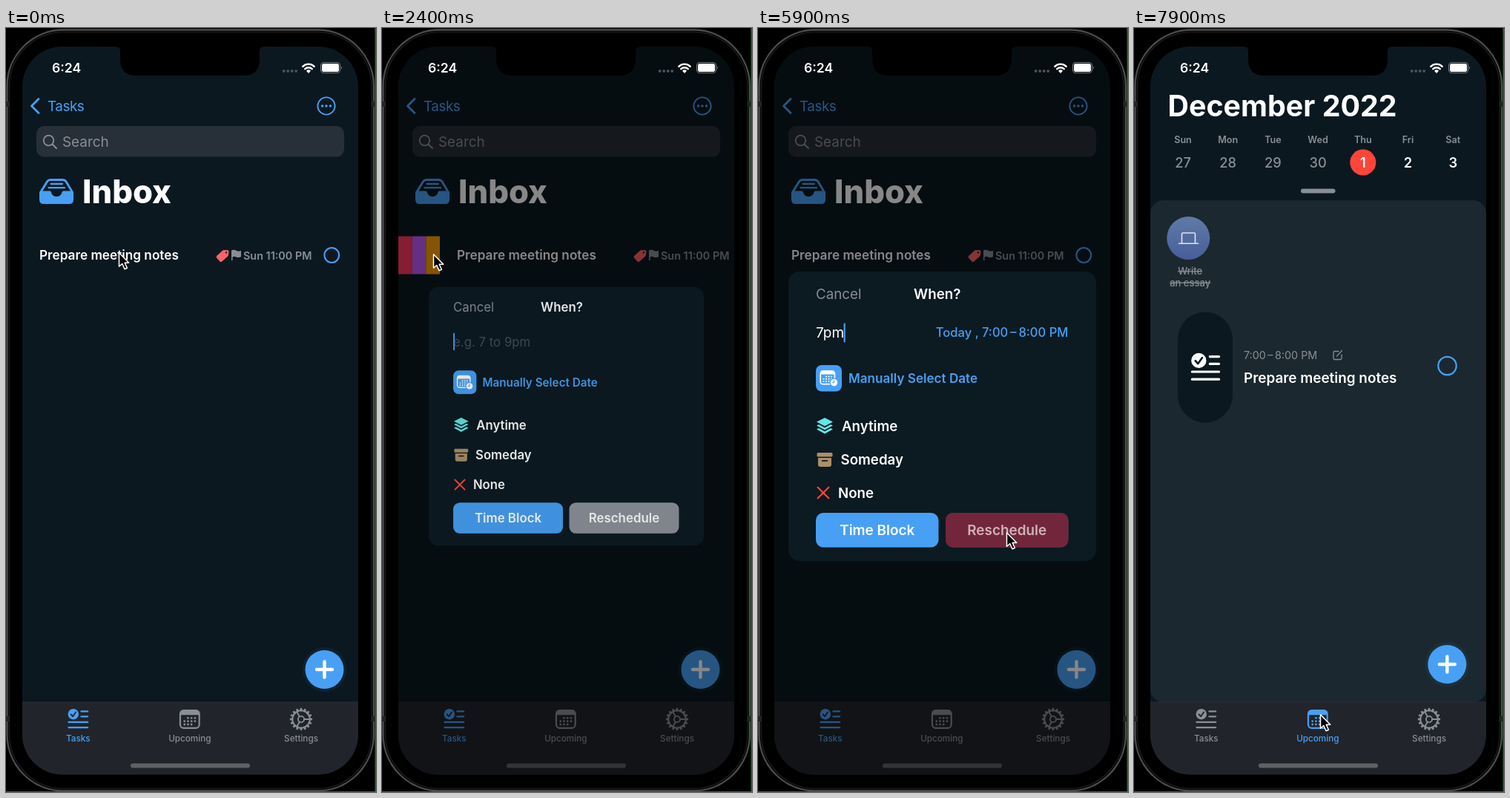
An HTML page that plays this animation: 499 by 1029 pixels, repeating every 8000 ms.

```html
<!DOCTYPE html>
<html lang="en">
<head>
<meta charset="utf-8">
<title>Scheduling a task</title>
<style>
  html, body { margin: 0; width: 100%; height: 100%; overflow: hidden; background: #000; }
  svg { display: block; width: 499px; height: 1029px; }
  text { font-family: Inter, "Open Sans", sans-serif; font-optical-sizing: none; white-space: pre; }
  .line { fill: none; stroke: currentColor; stroke-linecap: round; stroke-linejoin: round; }
</style>
</head>
<body>
<svg id="stage" viewBox="0 0 499 1029" xmlns="http://www.w3.org/2000/svg"></svg>
<script>
const BG = '#0b1820', BLUE = '#47a0f4', GREY = '#8a8f95', WHITE = '#fff';
const LOOP = 8000, STEP = 100;

// Text placed by the middle of its capital letters.
const label = (x, mid, size, weight, fill, str, more = '') =>
  `<text x="${x}" y="${(mid + size * 0.364).toFixed(1)}" font-size="${size}" font-weight="${weight}" fill="${fill}" ${more}>${str}</text>`;
const box = (x, y, w, h, r, fill, more = '') =>
  `<rect x="${x}" y="${y}" width="${w}" height="${h}" rx="${r}" fill="${fill}" ${more}/>`;
const dot = (x, y, r, fill, more = '') => `<circle cx="${x}" cy="${y}" r="${r}" fill="${fill}" ${more}/>`;
const line = (d, width, color = 'currentColor', more = '') =>
  `<path class="line" d="${d}" stroke-width="${width}" style="stroke:${color}" ${more}/>`;
const ring = (x, y, r, width, color) => dot(x, y, r, 'none', `stroke="${color}" stroke-width="${width}"`);
const place = (x, y, scale, color, icon) =>
  `<g transform="translate(${x} ${y}) scale(${scale})" color="${color}" fill="${color}">${icon}</g>`;
const MIDDLE = 'text-anchor="middle"';

// Icons are drawn around 0,0.
const calendar = (() => {
  let out = '<rect x="-12.5" y="-11.5" width="25" height="23" rx="4.5" fill="none" stroke="currentColor" stroke-width="2.1"/>' +
    '<path d="M-12.5 -5.5V-8a4 4 0 0 1 4-4h17a4 4 0 0 1 4 4v2.5z"/>';
  for (let row = 0; row < 3; row++)
    for (let col = 0; col < 4; col++)
      if (!(row === 0 && col === 0) && !(row === 2 && col === 3))
        out += dot(-6.9 + col * 4.6, -1.6 + row * 4.2, 1.35, 'currentColor');
  return out;
})();
const checklist = back =>
  dot(-6.3, -6.6, 7, 'currentColor') + line('M-9.5 -6.4l2.4 2.7 4-5.6', 1.8, back) +
  line('M4 -10.3H12.5M4 -3.6H12.5M-12.5 3.8H12.5M-12.5 10.8H12.5', 2.2);
const gear = (() => {
  let teeth = '', spokes = '';
  for (let i = 0; i < 16; i++) {
    const a = i * Math.PI / 8, c = Math.cos(a), s = Math.sin(a);
    teeth += `M${11.5 * c} ${11.5 * s}L${13.4 * c} ${13.4 * s}`;
  }
  for (let i = 0; i < 3; i++) {
    const a = i * Math.PI * 2 / 3, c = Math.cos(a), s = Math.sin(a);
    spokes += `M${4 * c} ${4 * s}L${11 * c} ${11 * s}`;
  }
  return ring(0, 0, 11.4, 2, 'currentColor') + ring(0, 0, 4, 1.8, 'currentColor') + line(teeth, 2.8) + line(spokes, 1.8);
})();
const pin = '<path d="M-7.5 -12H7.5V-9.2L4.6 -7.6L5.2 -1.5C7.6 0 9 2 9 4H-9C-9 2 -7.6 0 -5.2 -1.5L-4.6 -7.6L-7.5 -9.2Z"/><path d="M-1 4H1V10L0 13L-1 10Z"/>';
const tag = '<g transform="rotate(-42)"><path d="M-7 -5.2H4.2L8.8 -1.6Q10 0 8.8 1.6L4.2 5.2H-7Q-9 5.2 -9 3.2V-3.2Q-9 -5.2 -7 -5.2Z"/>' +
  dot(5.4, 0, 1.2, BG) + '</g>';
const flag = '<path d="M-6.5 -6.5Q-3.5 -8 0 -6.2T6.5 -6.3V2.3Q3 3.6 0 2.4T-5 2.6V7H-6.5Z"/>';
const layers = '<path d="M0 -11L11 -5.4L0 .2L-11 -5.4Z"/>' +
  '<path d="M-11 -.6L-8 -2L0 2.2L8 -2L11 -.6L0 5.2Z"/><path d="M-11 4.6L-8 3L0 7.2L8 3L11 4.6L0 10.6Z"/>';
const archive = box(-10.5, -9.5, 21, 5.6, 1.5, 'currentColor') +
  '<path d="M-9 -2.5H9V6.5Q9 9.5 6 9.5H-6Q-9 9.5 -9 6.5Z"/>' + line('M-3.3 1.3H3.3', 1.8, BG);
const cross = line('M-7.3 -7.3L7.3 7.3M7.3 -7.3L-7.3 7.3', 2.3);
const plus = dot(0, 0, 30, BLUE, 'opacity=".06"') + dot(0, 0, 26, BLUE) + line('M-10.5 0H10.5M0 -10.5V10.5', 4.4, WHITE);
const tray = `<path d="M45 221L54 206.5Q56 203 60 203H76.500Q80.500 203 82.500 206.500L91 221V231Q91 237 85 237H51Q45 237 45 231Z" fill="${BLUE}"/>` +
  `<path d="M49.500 219.500L56.500 208Q57.500 206 60 206H76.500Q79 206 80 208L87 219.500H77.500Q75.600 219.500 75.400 221.500A7.300 6.600 0 0 1 61 221.500Q60.800 219.500 59 219.500Z" fill="${BG}"/>` +
  line('M60.500 210H76M57.500 215.200H79', 2.3, BLUE);

const tab = (id, x, name, icon) =>
  `<g id="${id}" fill="currentColor">${place(x, 931, 1.03, 'currentColor', icon)}${label(x, 957, 11.7, 500, 'currentColor', name, MIDDLE)}</g>`;

const actions = [['#ff375f', place(0, 306, 0.75, WHITE, calendar)],
  ['#bf5af2', line('M0 298V309', 2, WHITE) + dot(0, 314, 1.4, WHITE)],
  ['#ff9f0a', place(0, 306, 0.95, WHITE, pin)]];

const emptyLines = ['To-dos that have not been', 'assigned a date, nor', 'marked as Anytime/',
  'Someday will appear here.', 'Keep the Inbox clean by', 'scheduling your tasks!'];

const inbox =
  line('M44 95.500L34.500 105L44 114.500', 2.8, BLUE) +
  label(56, 105, 18.9, 400, BLUE, 'Tasks', 'letter-spacing="-.5"') +
  ring(432, 105, 11.6, 1.9, BLUE) + [426.6, 432, 437.4].map(x => dot(x, 105, 1.7, BLUE)).join('') +
  box(41, 132, 415, 41.5, 10, '#272f38') +
  ring(57.5, 151.5, 6.8, 1.8, GREY) + line('M62.500 156.500L68 162', 2, GREY) +
  label(76, 153, 18.9, 400, GREY, 'Search') + tray +
  label(103, 220.5, 43.6, 800, WHITE, 'Inbox') +
  `<g id="empty">${emptyLines.map((s, i) => label(137, 502.5 + i * 23.2, 17, 600, GREY, s)).join('')}</g>` +
  '<g id="actions">' + actions.map(([color, icon]) => `<g>${box(0, 280.5, 86, 51, 0, color)}<g>${icon}</g></g>`).join('') + '</g>' +
  '<g id="row">' + label(45, 306, 17.2, 600, WHITE, 'Prepare meeting notes') +
  place(293, 306, 1, '#f9626a', tag) + place(310.5, 306, 1, GREY, flag) +
  label(320, 306.5, 14.4, 600, GREY, 'Sun 11:00 PM') + ring(439.3, 306, 9.9, 2, BLUE) + '</g>' +
  place(429.5, 864, 1, BLUE, plus);

const days = ['Sun', 'Mon', 'Tue', 'Wed', 'Thu', 'Fri', 'Sat'].map((day, i) => {
  const x = 66 + i * 60.7;
  return label(x, 150, 12.6, 600, GREY, day, MIDDLE) +
    (i === 4 ? dot(x, 181, 17.5, '#ff453a') : '') +
    label(x, 181, 18.3, i < 4 ? 500 : 600, i < 4 ? GREY : WHITE, [27, 28, 29, 30, 1, 2, 3][i], MIDDLE);
}).join('');

const upcoming =
  label(45.5, 105, 39.4, 750, WHITE, 'December 2022') + days +
  box(225, 216.5, 46.5, 6, 3, GREY) + box(22, 232, 453, 676, 18, '#1b282f') +
  dot(73.3, 283, 29, 'url(#badge)') +
  line('M64.500 289V277.500Q64.500 276 66 276H81Q82.500 276 82.500 277.500V289M60.500 290.300H86.500', 1.6, '#dfe4ee') +
  ['Write', 'an essay'].map((s, i) => label(75.7, 327.5 + i * 15.3, 13, 500, GREY, s, MIDDLE + ' text-decoration="line-through"')).join('') +
  box(59, 382.5, 74, 149, 37, BG) + place(96.5, 457.5, 1.45, WHITE, checklist(BG)) +
  label(148, 440.5, 14.3, 400, GREY, '7:00\u2009–\u20098:00 PM') +
  line('M276 435.500H270.500Q269 435.500 269 437V445Q269 446.500 270.500 446.500H278.500Q280 446.500 280 445V440M273.500 442L280.500 434.500', 1.3, GREY) +
  label(148, 471, 18.9, 600, WHITE, 'Prepare meeting notes') + ring(422.5, 455, 12.2, 2.2, BLUE) +
  place(422.3, 857, 1, BLUE, plus);

const panel =
  box(41, 328, 415, 390, 15, '#0c1a22') +
  label(78, 358, 18.8, 400, GREY, 'Cancel') + label(210, 358, 18.8, 600, WHITE, 'When?') +
  label(78, 410.5, 18.8, 400, '#474e54', 'e.g. 7 to 9pm', 'id="hint"') +
  label(78, 410.5, 19, 400, WHITE, '', 'id="typed"') +
  `<rect id="caret" y="397.500" width="2.200" height="26" rx="1" fill="${BLUE}"/>` +
  label(418.5, 410, 16.6, 500, BLUE, 'Today , 7:00\u2009–\u20098:00 PM', 'id="slot" text-anchor="end"') +
  box(78, 454, 35, 35.5, 8, BLUE) + place(93.8, 470.8, 0.77, WHITE, calendar) +
  dot(102.5, 477.5, 6, BLUE) + dot(102.5, 477.5, 4.8, WHITE) + line('M102.500 474.800V477.800H100.500', 1.1, BLUE) +
  label(122, 472, 17.1, 600, BLUE, 'Manually Select Date') +
  place(90, 536, 1, '#63e6e2', layers) + label(113, 536, 18.7, 600, WHITE, 'Anytime') +
  place(90, 581.5, 1, '#ac8e68', archive) + label(111.5, 581.5, 18.7, 600, WHITE, 'Someday') +
  place(88, 626, 1, '#ff453a', cross) + label(108, 626, 18.7, 600, WHITE, 'None') +
  box(78, 653, 165.5, 46.5, 10, BLUE) + label(160.7, 676.5, 18.9, 600, WHITE, 'Time Block', MIDDLE) +
  `<g id="confirm">${box(253, 653, 165.5, 46.5, 10, '#8e929b')}${box(253, 653, 165.5, 46.5, 10, '#ff375f', 'id="ready"')}</g>` +
  label(335.7, 676.5, 18.9, 600, WHITE, 'Reschedule', MIDDLE + ' id="confirmText"');

const status =
  label(62, 54, 17.6, 600, WHITE, '6:24') +
  [374.7, 380.2, 385.7, 391.2].map(x => dot(x, 58, 1.9, '#4b5258')).join('') +
  line('M400.300 51.800A11 11 0 0 1 415.700 51.800M403.200 55.200A7 7 0 0 1 412.800 55.200', 2.4, WHITE) +
  '<path d="M405 57.800A4.300 4.300 0 0 1 411 57.800L408 61Z" fill="#fff"/>' +
  box(424.5, 46.5, 26, 14, 4.2, 'none', 'stroke="#777d82" stroke-width="1.1"') + box(426, 48, 23, 11, 2.8, WHITE) +
  '<path d="M452 51.300Q454 53.500 452 55.700Z" fill="#777d82"/>';

document.getElementById('stage').innerHTML = `
  <defs>
    <clipPath id="glass"><rect x="22" y="25" width="453" height="980.500" rx="54"/></clipPath>
    <linearGradient id="badge" x1="0" y1="0" x2="0" y2="1">
      <stop offset="0" stop-color="#5f7ba6"/><stop offset="1" stop-color="#485d9b"/>
    </linearGradient>
  </defs>
  <rect width="499" height="1029"/>
  ${box(1.5, 2.5, 494.5, 1025, 76, '#000', 'stroke="#4b4c4e" stroke-width="2.400"')}
  ${box(4.5, 5.5, 488.5, 1019, 73, '#000', 'stroke="#1b1b1c" stroke-width="1.500"')}
  ${[99, 927].map(y => box(0, y, 5, 7, 0, '#242425') + box(493, y, 4, 7, 0, '#242425')).join('')}
  <path d="M497.500 0H499V1029H0V1028H497.500Z" fill="#0a7d12"/>
  <g clip-path="url(#glass)">
    ${box(22, 25, 453, 981, 0, BG)}
    <g id="inbox">${inbox}</g>
    <g id="upcoming">${upcoming}</g>
    ${box(22, 908, 453, 98, 0, '#21242a')}${box(22, 907.5, 453, 1, 0, '#2b2f35')}
    ${tab('tasksTab', 97.3, 'Tasks', checklist('#21242a'))}
    ${tab('upcomingTab', 247.8, 'Upcoming', calendar)}
    ${tab('settingsTab', 398, 'Settings', gear)}
    ${box(168, 990.5, 161, 6, 3, '#5f6164')}
    <rect id="dim" x="22" y="25" width="453" height="981"/>
    <path d="M148 25Q154 25 154 31V42Q154 64 176 64H320Q342 64 342 42V31Q342 25 348 25Z"/>
    ${status}
    <g id="panel">${panel}</g>
  </g>
  <path id="cursor" d="M.5 .8V19.300L4.800 15.500L8 22.700L11.400 21.200L8.200 14.200H13.800Z" fill="#000" stroke="#fff" stroke-width="1.500" stroke-linejoin="round"/>`;

// Each track is a list of [time, value...].
const tracks = {
  swipe: [[100, 0], [200, 12], [500, 115], [900, 222], [1100, 257], [2100, 257], [2200, 200], [2300, 122], [2400, 56], [2500, 19], [2600, 0]],
  cursor: [[100, 152, 302], [200, 164, 303], [500, 267, 307], [900, 374, 312], [1000, 374, 313], [1200, 262, 314], [1400, 130, 311],
    [1500, 101, 309], [1800, 69, 304], [4500, 69, 304], [4900, 150, 470], [5200, 275, 728], [5400, 328, 690], [5500, 335, 679],
    [6700, 335, 679], [6900, 318, 735], [7200, 262, 895], [7400, 251, 924]],
  dim: [[1900, 0], [2200, 0.47], [6000, 0.47], [6400, 0]],
  panel: [[2100, 0], [2300, 0.65], [2400, 0.9], [2600, 1], [6000, 1], [6300, 0]],
  scale: [[2100, 0.8], [2400, 0.894], [2600, 0.965], [2800, 0.995], [3000, 1], [6000, 1], [6300, 0.94]],
  ready: [[3500, 0], [3600, 0.15], [4000, 1]],
  press: [[5600, 1], [5700, 0.6], [5800, 0.42], [6000, 0.42], [6100, 1]],
  row: [[6400, 1], [6500, 0.92], [6900, 0]],
  empty: [[6400, 0], [6500, 0.08], [7000, 1]]
};
const typing = [[0, ''], [3600, '7'], [4200, '7p'], [4400, '7pm']];
const SWITCH = 7500;

function at(track, t) {
  const next = track.findIndex(k => k[0] > t);
  if (next < 0) return track[track.length - 1].slice(1);
  if (next === 0) return track[0].slice(1);
  const a = track[next - 1], b = track[next], p = (t - a[0]) / (b[0] - a[0]);
  return a.slice(1).map((v, i) => v + (b[i + 1] - v) * p);
}

const el = {};
document.querySelectorAll('#stage [id]').forEach(node => el[node.id] = node);
const fade = (node, value) => node.setAttribute('opacity', value);
const move = (node, x, y = 0) => node.setAttribute('transform', `translate(${x} ${y})`);

function draw(t) {
  const now = name => at(tracks[name], t)[0];
  const late = t >= SWITCH;
  el.inbox.style.display = late ? 'none' : '';
  el.upcoming.style.display = late ? '' : 'none';
  el.tasksTab.style.color = late ? GREY : BLUE;
  el.upcomingTab.style.color = late ? BLUE : GREY;
  el.settingsTab.style.color = GREY;

  const off = now('swipe'), part = off / 3;
  move(el.row, off);
  fade(el.row, now('row'));
  fade(el.empty, now('empty'));
  [...el.actions.children].forEach((action, i) => {
    const [rect, icon] = action.children;
    rect.setAttribute('x', 22 + i * part);
    rect.setAttribute('width', part);
    move(icon, 22 + (i + 0.5) * part);
    fade(icon, Math.min(1, Math.max(0, (part - 22) / 25)));
  });

  fade(el.dim, now('dim'));
  fade(el.panel, now('panel'));
  el.panel.setAttribute('transform', `translate(248.5 523) scale(${now('scale')}) translate(-248.5 -523)`);
  fade(el.ready, now('ready'));
  fade(el.slot, now('ready'));
  fade(el.confirm, now('press'));
  fade(el.confirmText, Math.sqrt(now('press')));

  const text = typing.filter(k => k[0] <= t).pop()[1];
  if (el.typed.textContent !== text) el.typed.textContent = text;
  fade(el.hint, text ? 0 : 1);
  el.caret.setAttribute('x', 78 + (text ? el.typed.getComputedTextLength() - 0.5 : 0));

  move(el.cursor, ...at(tracks.cursor, t));
}

const start = performance.now();
function frame() {
  const t = (performance.now() - start) % LOOP;
  draw(Math.floor(t / STEP) * STEP);
  requestAnimationFrame(frame);
}
frame();
</script>
</body>
</html>
```
